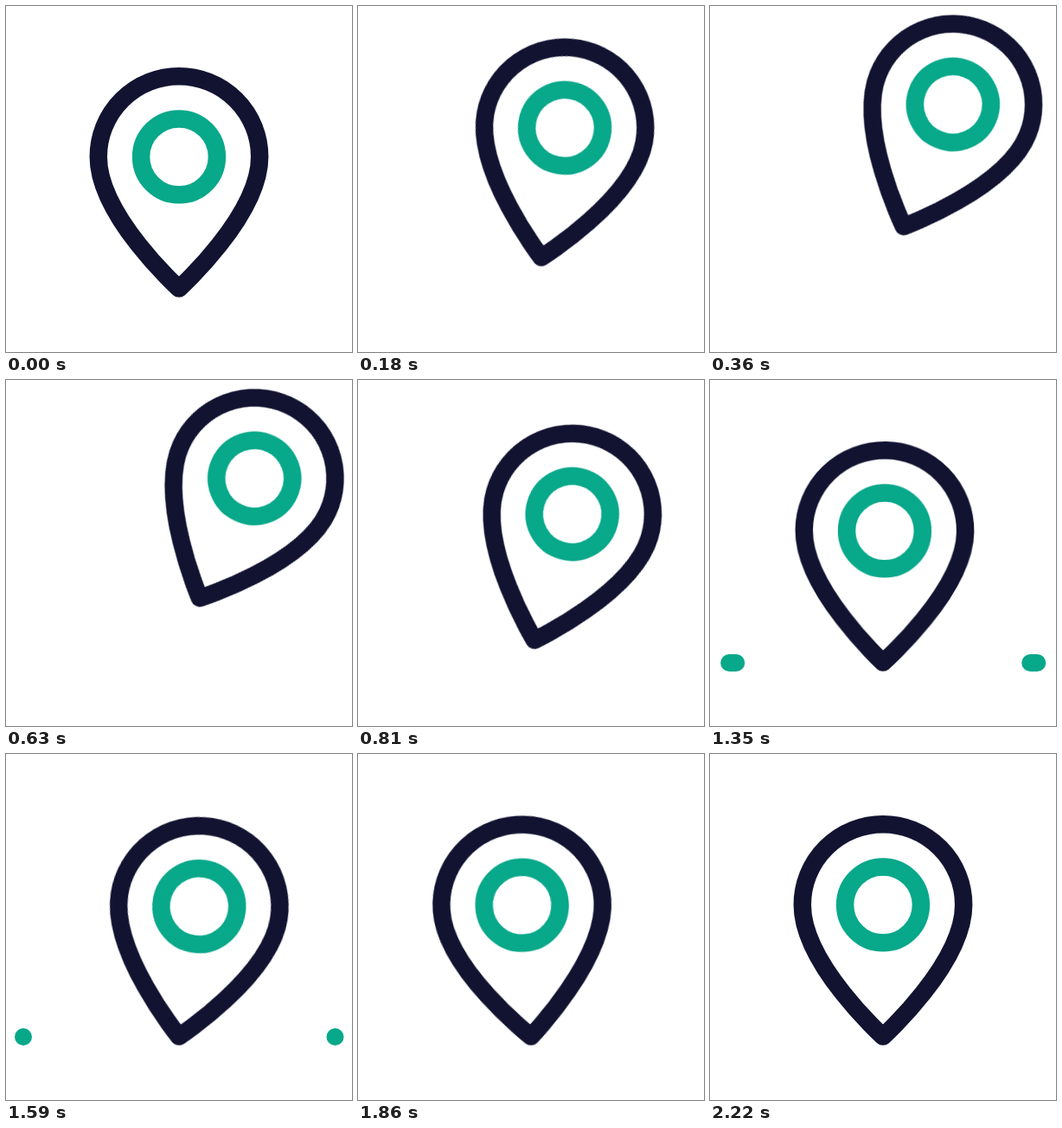
Animation of 400 by 400 pixels, one loop 4460 ms. Source, as an HTML page:

```html
<!DOCTYPE html>
<html lang="en">
<head>
<meta charset="utf-8">
<title>Map pin</title>
<style>
  :root { --loop: 4460ms linear infinite; }
  html, body {
    margin: 0;
    width: 100%;
    height: 100%;
    overflow: hidden;
    background: #fff;
  }
  svg { display: block; width: 100%; height: 100%; }
  path, circle { fill: none; stroke-width: 20.46px; stroke-linecap: round; stroke-linejoin: round; }
  .navy { stroke: #121331; }
  .green { stroke: #08a88a; }

  .shift { animation: shift var(--loop); }
  .lift { animation: lift var(--loop); }
  .tilt { animation: tilt var(--loop); transform-origin: 200px 326.6px; }
  .dash { stroke-width: 20px; animation: show var(--loop), travel var(--loop), length var(--loop); }

  /* The pin hops up to the right, then drops back on its tip */
  @keyframes shift {
    0% { transform: translateX(0); animation-timing-function: cubic-bezier(.33, 0, .25, 1); }
    12.71% { transform: translateX(26.7px); animation-timing-function: cubic-bezier(.333, 0, .667, 1); }
    19.96%, 100% { transform: translateX(0); }
  }
  @keyframes lift {
    0% { transform: translateY(0); animation-timing-function: cubic-bezier(.33, 0, .25, 1); }
    12.71% { transform: translateY(-80.2px); animation-timing-function: cubic-bezier(.333, 0, .667, 1); }
    21.52%, 100% { transform: translateY(0); }
  }
  /* Leaning in flight, then a damped wobble */
  @keyframes tilt {
    0% { transform: rotate(0deg); animation-timing-function: cubic-bezier(.33, 0, .3, 1); }
    12.71% { transform: rotate(25deg); animation-timing-function: cubic-bezier(.72, 0, .67, 1); }
    25% { transform: rotate(-19.4deg); animation-timing-function: cubic-bezier(.333, 0, .667, 1); }
    33.63% { transform: rotate(10.8deg); animation-timing-function: cubic-bezier(.333, 0, .667, 1); }
    42.6% { transform: rotate(-4.3deg); animation-timing-function: cubic-bezier(.333, 0, .667, 1); }
    50%, 100% { transform: rotate(0deg); }
  }

  /* Dashes shoot outwards on landing */
  @keyframes show {
    0%, 22.41% { visibility: hidden; }
    22.42%, 35.98% { visibility: visible; }
    35.99%, 100% { visibility: hidden; }
  }
  @keyframes travel {
    0%, 22.42% { stroke-dashoffset: 0px; animation-timing-function: cubic-bezier(.2, .48, .4, 1); }
    35.87%, 100% { stroke-dashoffset: -95px; }
  }
  @keyframes length {
    0%, 22.42% { stroke-dasharray: .01px 400px; animation-timing-function: ease-out; }
    24.66% { stroke-dasharray: 23.7px 400px; animation-timing-function: cubic-bezier(.33, .33, .6, 1); }
    35.87%, 100% { stroke-dasharray: .01px 400px; }
  }
</style>
</head>
<body>
<svg viewBox="0 0 400 400">
  <path class="dash green" d="M115 327H-5"/>
  <path class="dash green" d="M285.5 327H405.5"/>
  <g class="shift">
    <g class="lift">
      <g class="tilt">
        <path class="navy" d="M106.8 174.4A93.2 93.2 0 0 1 293.2 174.4C293.2 242.5 200 326.6 200 326.6S106.8 242.5 106.8 174.4Z"/>
        <circle class="green" cx="200" cy="174.4" r="43.9"/>
      </g>
    </g>
  </g>
</svg>
</body>
</html>
```
